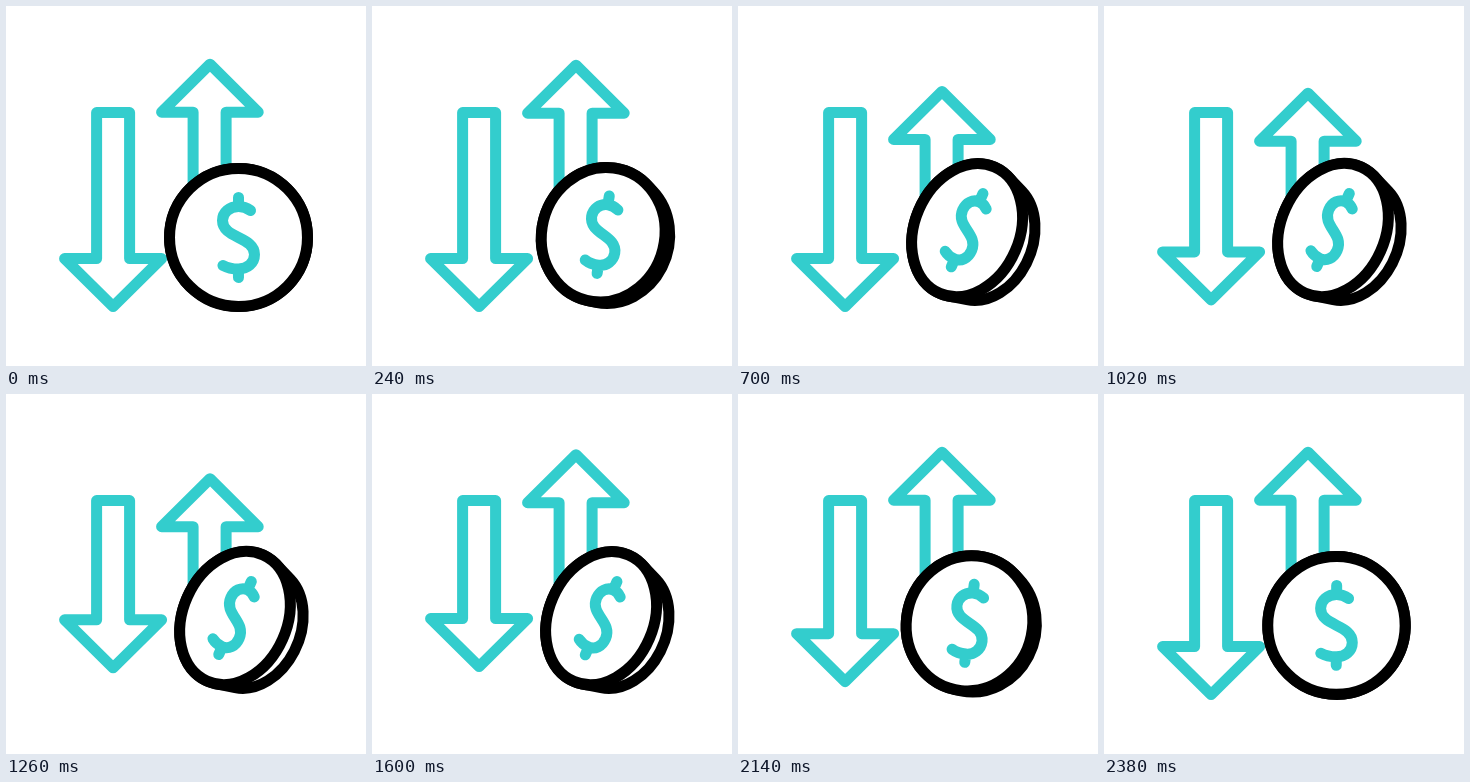
Write an HTML page that moves like this. It is 360 px wide and 360 px high and loops after 2.4 s.

```html
<!DOCTYPE html>
<html lang="en">
<head>
<meta charset="utf-8">
<title>Money transfer</title>
<style>
  html, body { margin: 0; width: 100%; height: 100%; overflow: hidden; background: #fff; }
  svg { display: block; width: 100%; height: 100%; }
  path, circle { stroke-width: 11; stroke-linecap: round; stroke-linejoin: round; vector-effect: non-scaling-stroke; }
  .teal { stroke: #33cdcd; }
  .ink { stroke: #000; }
</style>
</head>
<body>
<svg viewBox="0 0 360 360">
  <path id="down" class="teal" fill="none"/>
  <path id="up" class="teal" fill="none"/>
  <g id="coin">
    <path id="rim" class="ink" fill="#fff"/>
    <circle class="ink" r="69" fill="#fff"/>
    <path class="teal" fill="none" d="M12-27C8.5-29.5 4.5-31 0-31C-9-31-16-25-16-17C-16-8-8-4 0 0C8 4 16 8 16 17C16 25.5 9 31.5 0 31.5C-6 31.5-11 30.5-15.5 28M0-40V-31M0 31.5V40"/>
  </g>
</svg>
<script>
const LOOP = 2400, R = 69;
const el = id => document.getElementById(id);
const down = el('down'), up = el('up'), coin = el('coin'), rim = el('rim');

// Cubic bezier easing, solved for x by bisection
function bezier(x1, y1, x2, y2) {
  const at = (a, b, s) => 3 * s * (1 - s) * (1 - s) * a + 3 * s * s * (1 - s) * b + s * s * s;
  return x => {
    if (x <= 0) return 0;
    if (x >= 1) return 1;
    let lo = 0, hi = 1;
    for (let i = 0; i < 24; i++) {
      const mid = (lo + hi) / 2;
      if (at(x1, x2, mid) < x) lo = mid; else hi = mid;
    }
    return at(y1, y2, lo);
  };
}

const sharp = bezier(.8, 0, .2, 1);
const brisk = bezier(.72, 0, .28, 1);
const late = bezier(.75, 0, .4, 1);
const tilt = bezier(.33, .35, .67, 1);
const untilt = bezier(.33, 0, .67, .8);
const span = (t, from, to, ease) => ease((t - from) / (to - from));

function drawArrows(t) {
  const a = 29 * (span(t, 50, 950, sharp) - span(t, 980, 1880, sharp));
  const b = 28 * (span(t, 755, 1405, brisk) - span(t, 1800, 2400, late));
  const y = 106.2 + a, h = 252.6 - b;
  up.setAttribute('d', `M187.1 235V${y}H155.6L204 ${y - 48}L252.2 ${y}H220.1V235`);
  down.setAttribute('d', `M90.6 106.6H123.6V${h}H155.6L107.1 ${h + 48}L58.6 ${h}H90.6Z`);
}

// Tilted pose of the coin: turned 24 degrees and squashed across
const TURN = 24 * Math.PI / 180, SQUASH = .755;
const POSE = [SQUASH * Math.cos(TURN), SQUASH * Math.sin(TURN), -Math.sin(TURN), Math.cos(TURN)];

function drawCoin(t) {
  const p = span(t, 0, 800, tilt) - span(t, 1500, 2400, untilt);
  const [a, b, c, d] = POSE.map((v, i) => v * p + (i % 3 ? 0 : 1 - p));
  coin.setAttribute('transform',
    `matrix(${a} ${b} ${c} ${d} ${232.5 - 3.5 * p} ${231.5 - 7.5 * p})`);

  // The back is a smaller disc set off to one side, joined by two tangents
  const det = a * d - b * c, u = 18, v = 10;
  const dx = (d * u - c * v) / det, dy = (a * v - b * u) / det;
  const shrink = .092, r = R * (1 - shrink * p);
  const dir = Math.atan2(dy, dx);
  const open = Math.acos(R * shrink / Math.hypot(dx, dy));
  const face = k => `${R * Math.cos(dir + k)} ${R * Math.sin(dir + k)}`;
  const back = k => `${dx * p + r * Math.cos(dir + k)} ${dy * p + r * Math.sin(dir + k)}`;
  rim.setAttribute('d',
    `M${face(-open)}L${back(-open)}A${r} ${r} 0 0 1 ${back(open)}` +
    `L${face(open)}A${R} ${R} 0 1 1 ${face(-open)}Z`);
}

const start = performance.now();
function frame(now) {
  const t = Math.max(0, now - start) % LOOP;
  drawArrows(t);
  drawCoin(t);
  requestAnimationFrame(frame);
}
frame(start);
</script>
</body>
</html>
```
